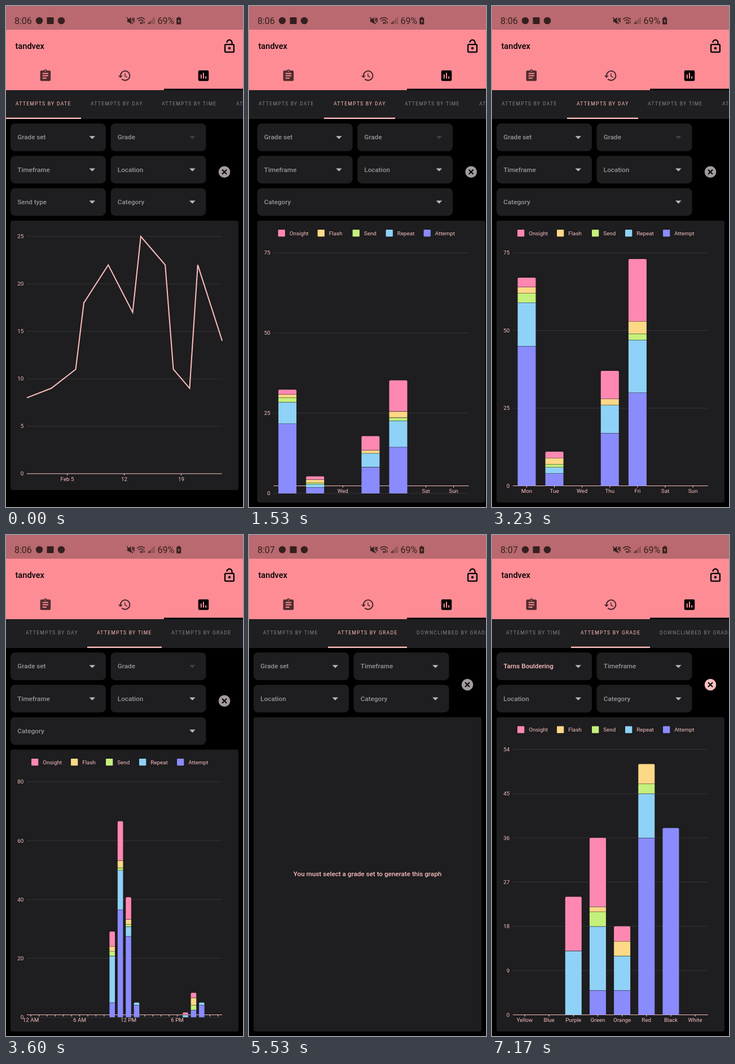
An HTML page that plays this animation: 420 by 887 pixels, repeating every 8 s.

```html
<!DOCTYPE html>
<html lang="en">
<head>
<meta charset="utf-8">
<title>Climbing statistics</title>
<style>
  html, body { margin: 0; width: 100%; height: 100%; overflow: hidden; background: #000; }
  svg { display: block; width: 100%; height: 100%; font-family: Roboto, sans-serif; }
  .status { font-size: 16px; fill: #35201f; }
  .title { font-size: 14.6px; font-weight: 500; }
  .tab { font-size: 8.6px; letter-spacing: 1.25px; fill: #858385; }
  .tab.on { fill: #fdbfbf; }
  .field { font-size: 11.7px; font-weight: 500; fill: #979597; }
  .accent { fill: #fdbfbf; }
  .label { font-size: 9.8px; fill: #f6c0c0; }
  .card { fill: #1e1d1f; }
  .grid { stroke: #343536; }
  .axis { stroke: #f6bcbc; stroke-width: 1.2; }
</style>
</head>
<body>
<svg viewBox="0 0 420 887" preserveAspectRatio="none">
  <rect width="420" height="887"/>
  <g id="pages"></g>

  <rect y="149" width="420" height="51" fill="#1f1e20"/>
  <g id="tabs"></g>
  <rect id="marker" y="197.6" height="2.4" fill="#fdbfbf"/>

  <rect width="420" height="149" fill="#fd8c95"/>
  <rect width="420" height="42" fill="#b9696f"/>
  <g fill="#35201f">
    <text class="status" id="clock" x="15" y="31.5"></text>
    <circle cx="59" cy="26" r="6.2"/>
    <rect x="72.5" y="20" width="12" height="12" rx="1"/>
    <circle cx="98" cy="26" r="6.3"/>
    <path d="M215 23.5h2.5l4-3.5v12l-4-3.5H215z"/>
    <g fill="none" stroke="#35201f" stroke-width="1.4">
      <path d="M214 20l11 12M223.5 21l1.5 2-1.5 2 1.5 2M226 21l1.5 2-1.5 2 1.5 2-1.5 2"/>
      <path d="M232 23.5q7-6 14 0M234.5 26.5q4.500-4 9 0"/>
      <path d="M242 27v5M245 31v-4" stroke-width="1.2"/>
    </g>
    <circle cx="239" cy="30" r="1.7"/>
    <path d="M252 29h1.500v3H252zM254.500 27h1.500v5h-1.500z"/>
    <path d="M257 24.500h1.500V32H257zM259.500 22h1.500v10h-1.500zM262 20h1.500v12H262z" opacity=".4"/>
    <text class="status" x="268.500" y="31.500">69%</text>
    <path d="M304.500 19.500h3.500V21h2.200v11.500h-8V21h2.300z"/>
    <path d="M307 22.500l-3 4.500h2l-.8 4 3.300-5h-2.200z" fill="#b9696f"/>
  </g>
  <text class="title" x="16.500" y="76">tandvex</text>
  <path transform="translate(382.400 57.900) scale(1.13)" d="M12 17c1.100 0 2-.9 2-2s-.9-2-2-2-2 .9-2 2 .9 2 2 2zm6-9h-1V6c0-2.760-2.240-5-5-5S7 3.240 7 6h1.900c0-1.710 1.390-3.100 3.100-3.100s3.100 1.390 3.100 3.100v2H6c-1.100 0-2 .9-2 2v10c0 1.100.9 2 2 2h12c1.100 0 2-.9 2-2V10c0-1.100-.9-2-2-2zm0 12H6V10h12z"/>
  <g fill="#4f2b2e">
    <path transform="translate(57.500 111.200) scale(1.03)" d="M19 3h-4.180a3 3 0 0 0-5.640 0H5a2 2 0 0 0-2 2v14a2 2 0 0 0 2 2h14a2 2 0 0 0 2-2V5a2 2 0 0 0-2-2zm-7 0a1 1 0 1 1 0 2 1 1 0 0 1 0-2zm2 14H7v-2h7zm3-4H7v-2h10zm0-4H7V7h10z"/>
    <path transform="translate(197.700 111) scale(1.03)" d="M13 3a9 9 0 0 0-9 9H1l4 4 4-4H6a7 7 0 1 1 2.060 4.940l-1.420 1.420A9 9 0 1 0 13 3zm-1 5v5l4.280 2.540.72-1.210-3.500-2.080V8z"/>
  </g>
  <path transform="translate(337.600 111) scale(1.03)" d="M19 3H5a2 2 0 0 0-2 2v14a2 2 0 0 0 2 2h14a2 2 0 0 0 2-2V5a2 2 0 0 0-2-2zM9 17H7v-7h2zm4 0h-2V7h2zm4 0h-2v-4h2z"/>
  <rect x="280" y="146.500" width="140" height="2.500"/>
</svg>
<script>
const LOOP = 8000;
const BASE = 849.5;
const CLOCK_TICK = 3870;
const GRADE_CHOSEN = 6690;
const SWIPES = [[1290, 296], [3270, 296], [5230, 296]];

const SERIES = [
  ['Onsight', '#ff88b3', 45], ['Flash', '#fdd887', 115], ['Send', '#c5f07b', 177],
  ['Repeat', '#8fd2f7', 236], ['Attempt', '#8a8bfd', 303]
];
const COLORS = SERIES.map(s => s[1]).reverse();

const TABS = ['DATE', 'DAY', 'TIME', 'GRADE'].map(s => 'ATTEMPTS BY ' + s).concat('DOWNCLIMBED BY GRADE');
const TAB_LEFT = [0, 133, 259, 391, 531];
const TAB_SCROLL = [0, 0, 115, 251];

// Stacks run bottom to top: attempt, repeat, send, flash, onsight.
const CHARTS = [
  {
    id: 'day', start: 1320, end: 1757, top: 437, max: 75, step: 25, x0: 61.5, dx: 49.1, width: 32,
    ticks: ['Mon', 'Tue', 'Wed', 'Thu', 'Fri', 'Sat', 'Sun'],
    bars: { 0: [45, 14, 3, 2, 3], 1: [4, 2, 1, 2, 2], 3: [17, 9, 0, 2, 9], 4: [30, 17, 2, 4, 20] }
  },
  {
    id: 'time', start: 3262, end: 3669, top: 437, max: 80, step: 20, x0: 44, dx: 14.42, width: 9.6,
    ticks: Array.from({ length: 24 }, (_, h) => h % 6 ? '' : `${h % 12 || 12} ${h < 12 ? 'AM' : 'PM'}`),
    bars: {
      10: [6, 19, 2, 2, 6], 11: [44, 16, 1, 3, 16], 12: [33, 4, 1, 2, 9], 13: [5, 1],
      19: [0, 1, 0, 0, 1], 20: [3, 0, 2, 3, 2], 21: [5, 1]
    }
  },
  {
    id: 'grade', start: GRADE_CHOSEN, end: 7150, top: 379.5, max: 54, step: 9, x0: 58, dx: 43.15, width: 29,
    ticks: ['Yellow', 'Blue', 'Purple', 'Green', 'Orange', 'Red', 'Black', 'White'],
    bars: { 2: [0, 13, 0, 0, 11], 3: [5, 13, 3, 1, 14], 4: [5, 7, 0, 3, 3], 5: [36, 9, 2, 4], 6: [38] }
  }
];

const $ = id => document.getElementById(id);
const clamp = v => Math.min(1, Math.max(0, v));
const text = (x, y, s, cls, anchor = 'start') =>
  `<text x="${x}" y="${y}" class="${cls}" text-anchor="${anchor}">${s}</text>`;
const rect = (x, y, w, h, r, attrs) =>
  `<rect x="${x}" y="${y}" width="${w}" height="${h}" rx="${r}" ${attrs}/>`;
const line = (x1, y1, x2, y2, attrs) =>
  `<line x1="${x1}" y1="${y1}" x2="${x2}" y2="${y2}" ${attrs}/>`;
const card = (y, bottom) => rect(8, y, 404, bottom - y, 4, 'class="card"');

function field(col, row, label, { wide, off, cls = '' } = {}) {
  const x = col ? 185.5 : 8, y = 208 + row * 57.2, w = wide ? 346.5 : 169;
  return rect(x, y, w, 49, 8, 'class="card"') + text(x + 12.3, y + 28.3, label, 'field ' + cls) +
    `<path d="M${x + w - 29.5} ${y + 22.2}h10.600l-5.300 5.300z" fill="${off ? '#414042' : '#bab8ba'}"/>`;
}

const clearIcon = (y, color) => `<circle cx="387" cy="${y}" r="10.300" fill="${color}"/>
  <path d="M383 ${y - 4}l8 8m0-8l-8 8" stroke="#000" stroke-width="2"/>`;

const commonFields = field(0, 0, 'Grade set') + field(1, 0, 'Grade', { off: true }) +
  field(0, 1, 'Timeframe') + field(1, 1, 'Location') + clearIcon(293.8, '#a29c9d');

const yLabels = (max, step, y) => {
  let out = '';
  for (let v = 0; v <= max; v += step)
    out += line(37, y(v), 383, y(v), 'class="grid"') + text(31.3, y(v) + 3.4, v, 'label', 'end');
  return out;
};

const xTick = (x, y, label) => line(x, y, x, y + 3, 'class="axis"') +
  (label ? text(x, y + 12.5, label, 'label', 'middle') : '');

function lineChart() {
  const y = v => 828 - v * 16.8, x = day => 37 + day * 14.42;
  const points = [[0, 8], [3, 9], [6, 11], [7, 18], [10, 22], [13, 17], [14, 25], [17, 22], [18, 11], [20, 9], [21, 22], [24, 14]];
  return card(380, 857) + yLabels(25, 5, y) + line(37, 828, 383, 828, 'class="axis"') +
    [[5, 'Feb 5'], [12, '12'], [19, '19']].map(([d, s]) => xTick(x(d) - .5, 828, s)).join('') +
    `<polyline points="${points.map(([d, v]) => [x(d), y(v)])}" fill="none" stroke="#fdbfbf" stroke-width="2"/>`;
}

function bar(cx, width, stack, y) {
  const left = cx - width / 2, total = stack.reduce((a, b) => a + b);
  let sum = 0, out = '';
  stack.forEach((value, i) => {
    if (!value) return;
    const bottom = y(sum), top = y(sum += value), r = sum === total ? Math.min(2, bottom - top) : 0;
    out += `<path d="M${left} ${bottom}V${top + r}q0 ${-r} ${r} ${-r}h${width - 2 * r}q${r} 0 ${r} ${r}V${bottom}z" fill="${COLORS[i]}"/>`;
    if (sum < total) out += line(left, top, left + width, top, 'stroke="#131214" stroke-width="1.1"');
  });
  return out;
}

// The zero line starts below the axis and rises to it as the bars grow.
function barChart(c, p) {
  const zero = BASE + 26 * (1 - p);
  const y = v => zero - v * (zero - c.top) / c.max;
  const legendY = c.top - 34.7;
  return SERIES.map(([name, color, x]) =>
      rect(x, legendY - 6.3, 12.3, 12.3, 1, `fill="${color}"`) + text(x + 20.3, legendY + 3.3, name, 'label')).join('') +
    yLabels(c.max, c.step, y) + line(37, BASE, 383, BASE, 'class="axis"') +
    c.ticks.map((s, i) => xTick(c.x0 + i * c.dx, BASE, s)).join('') +
    Object.entries(c.bars).map(([i, stack]) =>
      bar(c.x0 + i * c.dx, c.width, stack.map(v => v * p), y)).join('');
}

const barPage = id => commonFields + field(0, 2, 'Category', { wide: true }) + card(380, 879) + `<g id="${id}"></g>`;

const gradePage = field(1, 0, 'Timeframe') + field(0, 1, 'Location') + field(1, 1, 'Category') + card(322.5, 879) +
  `<g id="unset">${field(0, 0, 'Grade set') + clearIcon(265, '#a29c9d') +
    text(210, 604.3, 'You must select a grade set to generate this graph', 'field accent', 'middle')}</g>` +
  `<g id="chosen">${field(0, 0, 'Tarns Bouldering', { cls: 'accent' }) + clearIcon(265, '#fdbfbf')}<g id="grade"></g></g>`;

const datePage = commonFields + field(0, 2, 'Send type') + field(1, 2, 'Category') + lineChart();

$('pages').innerHTML = [datePage, barPage('day'), barPage('time'), gradePage]
  .map((page, i) => `<g transform="translate(${i * 420})">${page}</g>`).join('');
$('tabs').innerHTML = TABS.map((s, i) => text(TAB_LEFT[i] + 17, 176.3, s, 'tab')).join('');
const tabLabels = [...$('tabs').children];

const swipe = (t, start, length) => 1 - (1 - clamp((t - start) / length) ** 1.4) ** 3;
const pagePosition = (t, speed = 1) =>
  SWIPES.reduce((sum, [start, length]) => sum + swipe(t, start, length * speed), 0);

function between(list, pos) {
  const i = Math.min(Math.floor(pos), list.length - 2);
  return list[i] + (list[i + 1] - list[i]) * (pos - i);
}

function render(t) {
  $('pages').setAttribute('transform', `translate(${-420 * pagePosition(t)})`);

  const tab = pagePosition(t, .8);
  const scroll = between(TAB_SCROLL, tab), left = between(TAB_LEFT, tab);
  const widths = TAB_SCROLL.map((_, i) => TAB_LEFT[i + 1] - TAB_LEFT[i]);
  $('tabs').setAttribute('transform', `translate(${-scroll})`);
  $('marker').setAttribute('x', left - scroll);
  $('marker').setAttribute('width', between(widths, tab));
  tabLabels.forEach((label, i) => label.classList.toggle('on', i === Math.round(tab)));

  for (const c of CHARTS) {
    const p = clamp((t - c.start) / (c.end - c.start));
    if (p === c.shown) continue;
    $(c.id).innerHTML = barChart(c, p);
    c.shown = p;
  }

  const chosen = t >= GRADE_CHOSEN;
  $('unset').style.display = chosen ? 'none' : '';
  $('chosen').style.display = chosen ? '' : 'none';
  $('clock').textContent = t < CLOCK_TICK ? '8:06' : '8:07';
}

const began = performance.now();
function frame() {
  render((performance.now() - began) % LOOP);
  requestAnimationFrame(frame);
}
frame();
</script>
</body>
</html>
```
